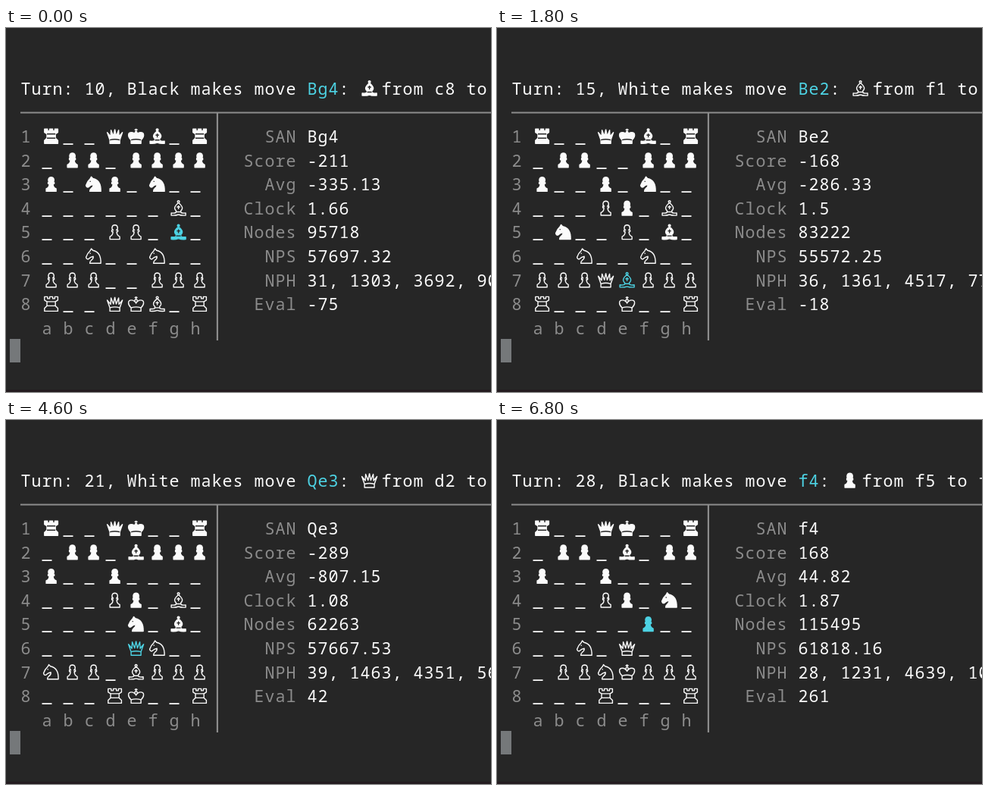
An HTML page with a canvas for the animation above (7 s loop, 640 by 480 pixels).

```html
<!DOCTYPE html>
<html lang="en">
<head>
<meta charset="utf-8">
<title>Terminal chess</title>
<style>
  html, body { margin: 0; width: 100%; height: 100%; overflow: hidden; background: #262626; }
  canvas { display: block; }
</style>
</head>
<body>
<canvas id="stage" width="640" height="480"></canvas>
<script>
const ctx = document.getElementById('stage').getContext('2d');
const CELL = 14, LINE = 31.6, LEFT = 19;
const BACK = '#262626', WHITE = '#fbfbfb', GREY = '#8c8c8c', CYAN = '#4dd2e3';
const LOOP = 7000, STEP = 200;

// Position after the first listed move; capitals are White.
const START = 'r..qkb.r/.pp.pppp/p.np.n../......B./...PP.b./..N..N../PPP..PPP/R..QKB.R';
const GAME = `c8 Bg4, d4 d5, c6 Nb4, d1 Qd2, e7 e5, f1 Be2, f8 Be7, a1 Rd1, b4 Nxa2, c3 Nxa2,
  f6 Nxe4, d2 Qe3, e4 Nxg5, f3 Nd2, g4 Bxe2, e1 Kxe2, f7 f5, a2 Nc3, f5 f4`;

// Key moments; moves and figures in between are interpolated.
const KEYS = [
  { step: 0, turn: 10, score: -211, avg: -335.13, nodes: 95718, nps: 57697.32, nph: [31, 1303, 3692], eval: -75 },
  { step: 6, turn: 14, score: -202, avg: -298.74, nodes: 90221, nps: 55193.9, nph: [35, 1348, 4161], eval: -58 },
  { step: 12, turn: 17, score: -99, avg: -261.5, nodes: 69225, nps: 56328.94, nph: [38, 1388, 5229], eval: 63 },
  { step: 19, turn: 19, score: 172, avg: -151.53, nodes: 178224, nps: 40842.24, nph: [34, 1169, 3808], eval: 178 },
  { step: 23, turn: 21, score: -289, avg: -807.15, nodes: 62263, nps: 57667.53, nph: [39, 1463, 4351], eval: 42 },
  { step: 29, turn: 25, score: -291, avg: -974.46, nodes: 65316, nps: 58289.7, nph: [41, 1443, 4266], eval: -285 },
  { step: 34, turn: 28, score: 168, avg: 44.82, nodes: 115495, nps: 61818.16, nph: [28, 1231, 4639], eval: 261 }
];

// Returns a reader that interpolates any field where `axis` equals `value`.
function between(axis, value) {
  const next = KEYS.findIndex(key => key[axis] >= value);
  const b = KEYS[next], a = KEYS[Math.max(0, next - 1)];
  const mix = a === b ? 0 : (value - a[axis]) / (b[axis] - a[axis]);
  return read => read(a) + (read(b) - read(a)) * mix;
}

function figures(turn) {
  const at = between('turn', turn);
  const nodes = Math.round(at(k => k.nodes)), nps = at(k => k.nps);
  const heights = [0, 1, 2].map(i => Math.round(at(k => k.nph[i])));
  const rest = heights.reduce((left, n) => left - n, nodes);
  return {
    Score: Math.round(at(k => k.score)), Avg: +at(k => k.avg).toFixed(2),
    Clock: +(nodes / nps).toFixed(2), Nodes: nodes, NPS: +nps.toFixed(2),
    NPH: [...heights, rest].join(', '), Eval: Math.round(at(k => k.eval))
  };
}

const squareIndex = name => (8 - name[1]) * 8 + name.charCodeAt(0) - 97;

const board = [...START.replaceAll('/', '')];
const moves = GAME.split(',').map((entry, i) => {
  const [from, san] = entry.trim().split(' ');
  const to = san.slice(-2), target = squareIndex(to);
  if (i) {
    board[target] = board[squareIndex(from)];
    board[squareIndex(from)] = '.';
  }
  return { turn: KEYS[0].turn + i, san, from, to, target, board: [...board] };
});

// Piece outlines around the middle of the base; all but the knight are right halves.
const HALVES = {
  K: 'M0-19.5V-16M0-18H2M0-16.5Q3-14 0-10.5Q2.5-14.5 6-14.5Q10-14.5 10-11Q10-8 6.5-4.5V0H0',
  Q: 'M0-18.5L1.8-9.5L5-17.5L5.5-9L10-14.5L6.5-4.5V0H0',
  R: 'M0-19H2V-16.5H4.8V-19H8.8V-14.5L5.6-12.5V-7L8.8-4V0H0',
  B: 'M0-19.3A1.4 1.4 0 0 1 0-16.5Q5.5-12 5-9Q4.5-7 3-6L3.5-3.5Q6-2.5 9.5-3V0Q4 0.5 0-1',
  P: 'M0-18.8A3.7 3.7 0 0 1 2-12H4V-10H2.5Q2.5-5 6.5-3.5V0H0'
};
const DETAILS = {
  K: 'M-6.5-4.5Q0-6.5 6.5-4.5', Q: 'M-6.5-4.5Q0-6.5 6.5-4.5', R: 'M-5.6-12.5H5.6M-5.6-7H5.6',
  B: 'M0-13V-8M-2.2-11H2.2M-3-4.5H3', N: 'M-5-13H-3.8', P: ''
};
const SHAPES = { N: new Path2D('M-5 0H9.5Q10-15-1-17L-3-19.2L-4.5-16.5Q-8-13.5-10-8Q-9.5-5-7-5.5Q-4-8.5-0.5-9Q0-6-3-4Q-5-2.5-5 0Z') };
for (const kind in HALVES) {
  const half = new Path2D(HALVES[kind]);
  SHAPES[kind] = new Path2D(half);
  SHAPES[kind].addPath(half, new DOMMatrix([-1, 0, 0, 1, 0, 0]));
}

const columnX = col => LEFT + col * CELL;
const baseline = row => 87.7 + row * LINE;

ctx.font = '21.7px "Noto Sans Mono", monospace';
const gap = CELL - ctx.measureText('0').width;
ctx.letterSpacing = `${gap}px`;
ctx.lineJoin = 'round';

function text(str, col, row, color) {
  ctx.fillStyle = color;
  ctx.fillText(str, columnX(col) + gap / 2, baseline(row));
}

function piece(code, col, row, color) {
  const kind = code.toUpperCase(), solid = code !== kind;
  ctx.save();
  ctx.translate(columnX(col) + 12.6, baseline(row) + 1.3);
  ctx.lineWidth = 1.4;
  ctx.strokeStyle = ctx.fillStyle = color;
  if (solid) ctx.fill(SHAPES[kind]);
  ctx.stroke(SHAPES[kind]);
  if (solid) ctx.strokeStyle = BACK;
  ctx.stroke(new Path2D(DETAILS[kind]));
  ctx.restore();
}

function rect(x, y, w, h, color) {
  ctx.fillStyle = color;
  ctx.fillRect(x, y, w, h);
}

function draw({ turn, san, from, to, target, board }) {
  rect(0, 0, 640, 480, BACK);
  rect(0, 477, 640, 3, '#241c20');
  rect(LEFT, 110.6, 640, 2, GREY);
  rect(277.8, 111, 2.2, 301, GREY);
  rect(5, 410, CELL, 31, '#75787a');

  const intro = `Turn: ${turn}, ${turn % 2 ? 'White' : 'Black'} makes move `;
  const colon = intro.length + san.length;
  text(intro, 0, 0, WHITE);
  text(san, intro.length, 0, CYAN);
  text(':', colon, 0, WHITE);
  piece(board[target], colon + 2, 0, WHITE);
  text(`from ${from} to ${to}`, colon + 4, 0, WHITE);

  for (let rank = 1; rank <= 8; rank++) text(rank, 0, rank + 1, GREY);
  text('a b c d e f g h', 2, 10, GREY);
  board.forEach((code, i) => {
    const col = 2 + i % 8 * 2, row = 2 + (i >> 3);
    if (code === '.') text('_', col, row, WHITE);
    else piece(code, col, row, i === target ? CYAN : WHITE);
  });

  Object.entries({ SAN: san, ...figures(turn) }).forEach(([label, value], i) => {
    text(label, 26 - label.length, i + 2, GREY);
    text(value, 27, i + 2, WHITE);
  });
}

let shown;
function tick() {
  const step = Math.floor(performance.now() % LOOP / STEP);
  const turn = Math.floor(between('step', step)(key => key.turn));
  if (turn !== shown) draw(moves[turn - KEYS[0].turn]);
  shown = turn;
  requestAnimationFrame(tick);
}
tick();
</script>
</body>
</html>
```
